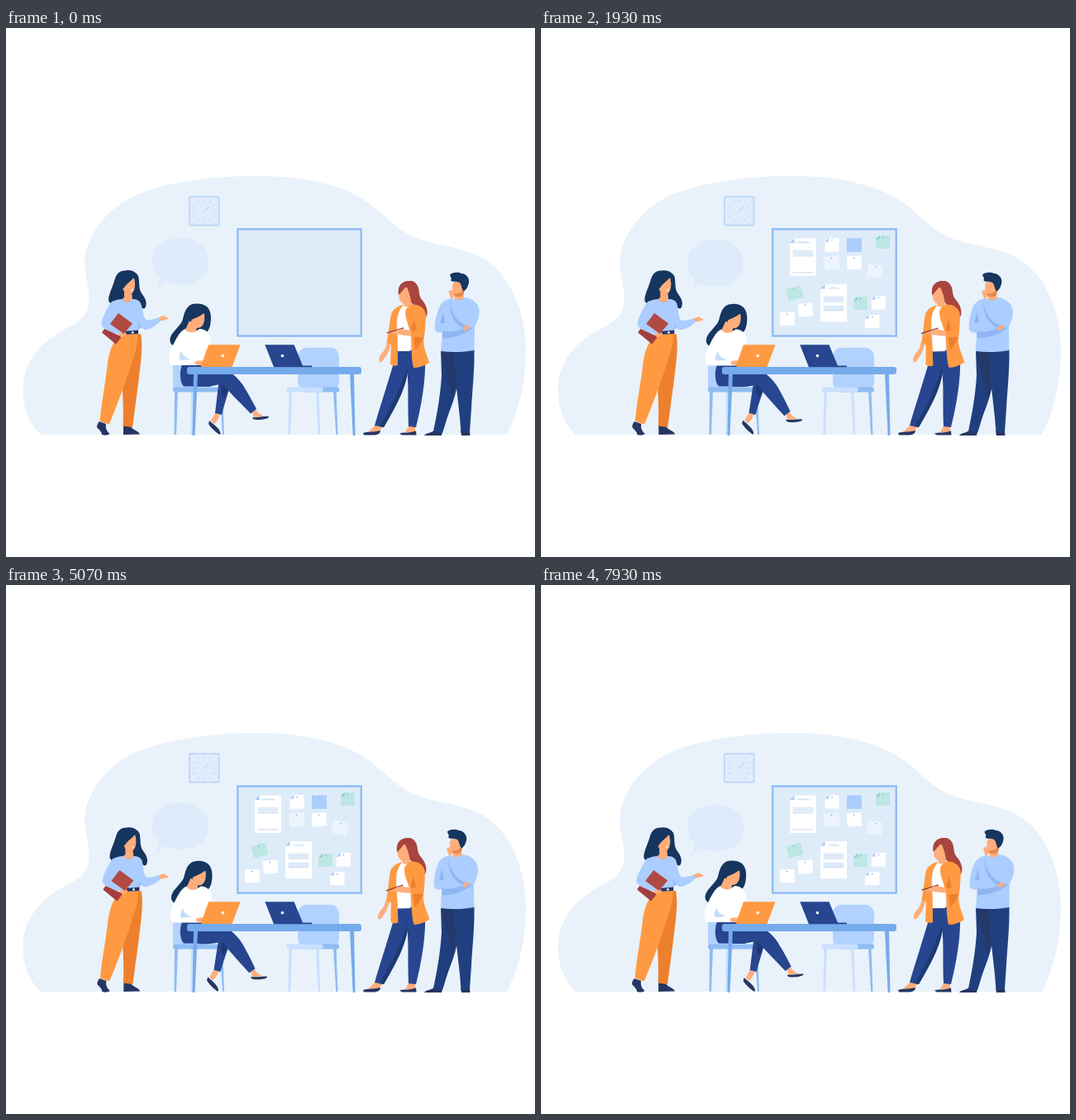
Write an HTML page with a canvas that moves like this. It is 640 px wide and 640 px high and loops after 8 s.

```html
<!DOCTYPE html>
<html lang="en">
<head>
<meta charset="utf-8">
<title>Team meeting</title>
<style>
html, body { margin: 0; width: 100%; height: 100%; overflow: hidden; background: #fff; }
canvas { display: block; width: 100vw; height: 100vh; }
</style>
</head>
<body>
<canvas id="stage" width="640" height="640"></canvas>
<script>
const ctx = document.getElementById('stage').getContext('2d');
const LOOP = 8000, FPS = 14;
const SKIN = '#ffad7b', NAVY = '#16355f', SHOE = '#253662', JEANS = '#27468f',
      ORANGE = '#ff9a42', RUST = '#ee802d', BLUE = '#abcdff', SHADE = '#8fb6f2',
      RED = '#a9453e', MID = '#8fbcf3', CHAIR = '#b1d2ff', LIGHT = '#c9e0ff';

const cache = new Map();
function fill(color, d) {
  if (!cache.has(d)) cache.set(d, new Path2D(d));
  ctx.fillStyle = color;
  ctx.fill(cache.get(d));
}
function box(color, x, y, w, h, r = 0) {
  ctx.fillStyle = color;
  ctx.beginPath();
  ctx.roundRect(x, y, w, h, r);
  ctx.fill();
}
function dot(color, x, y, rx, ry = rx) {
  ctx.fillStyle = color;
  ctx.beginPath();
  ctx.ellipse(x, y, rx, ry, 0, 0, 7);
  ctx.fill();
}
function line(color, width, x1, y1, x2, y2) {
  ctx.strokeStyle = color;
  ctx.lineWidth = width;
  ctx.beginPath();
  ctx.moveTo(x1, y1);
  ctx.lineTo(x2, y2);
  ctx.stroke();
}
function group(move, draw) {
  ctx.save();
  move();
  draw();
  ctx.restore();
}
const shift = (x, y) => () => ctx.translate(x, y);
const turn = (x, y, a) => () => {
  ctx.translate(x, y);
  ctx.rotate(a);
  ctx.translate(-x, -y);
};

// damped spring from 0 to 1
function spring(ms) {
  if (ms <= 0) return 0;
  const a = ms * 0.0095;
  return 1 - Math.exp(-0.6 * a) * Math.cos(a);
}

// x, y, width, height, angle, colour, start, folded corner colour
const notes = [
  [379, 262.6, 18, 16.6, 0, '#abcefe', 330],
  [298, 352, 18, 16, 0, '#fff', 310],
  [379, 283.8, 17.5, 16, -0.07, '#fff', 380],
  [320, 341, 17.5, 16, -0.08, '#fff', 380],
  [404, 294, 18, 15.5, 0.17, '#edf4fd', 590],
  [352, 284, 18, 16, -0.08, '#edf4fd', 647],
  [307, 321, 18, 15, -0.25, '#bce7e3', 690],
  [352, 262.5, 17, 16.5, 0, '#fff', 790, '#a9ccf8'],
  [386.5, 333, 17, 16, 0, '#bce7e3', 900, '#86cfc0'],
  [408.5, 332.3, 17, 16.5, 0, '#fff', 980, '#a9ccf8'],
  [400.8, 355, 17.5, 16, 0, '#fff', 1060, '#a9ccf8'],
  [413.5, 259, 17, 16, 0, '#bce7e3', 1120, '#86cfc0'],
];

function pop(x, y, angle, start, t, draw) {
  const k = spring(t - start);
  if (k <= 0) return;
  group(() => {
    ctx.translate(x, y);
    ctx.rotate(angle);
    ctx.scale(k, k);
  }, draw);
}
function fold(x, y, size, color) {
  fill('#deecfa', `M${x} ${y}h${size}L${x} ${y + size}Z`);
  fill(color, `M${x + size} ${y}v${size}h${-size}Z`);
}
function sheet(x, y, start, t, rows, title) {
  pop(x, y, 0, start, t, () => {
    box('#fff', -16, -22.7, 32, 45.4);
    fold(-16, -22.7, 5.5, '#a9ccf8');
    line('#b4cff3', 0.8, -title, -17.5, title, -17.5);
    line('#d3e3f8', 0.7, -title + 2, -19, title - 2, -19);
    for (const r of rows) line('#b4cff3', 0.8, -12.3, r, 12.3, r);
  });
}
function board(t) {
  box('#deecfa', 280, 243, 150, 130);
  ctx.strokeStyle = '#90bdf3';
  ctx.lineWidth = 2.4;
  ctx.strokeRect(280.3, 243.4, 149.4, 129.2);
  sheet(317, 277.2, 50, t, [-7.4, -5.4, -3.4, -1.4, 18.7], 8);
  sheet(354, 332.6, 280, t, [-7, -5.2, -3.4, -1.6, 4, 5.8, 7.6, 9.2], 6.5);
  for (const [x, y, w, h, angle, color, start, corner] of notes) {
    pop(x, y, angle, start, t, () => {
      box(color, -w / 2, -h / 2, w, h);
      if (corner) fold(-w / 2, -h / 2, 4.5, corner);
      dot('#8ba8cf', 0, -h / 2 + 2.4, 0.8);
    });
  }
}

function room(drop) {
  fill('#e9f2fa', 'M42 492C30 481 20.5 462 20.5 438C20.5 411 35 388 57 373C73 362 88 358 96 346C106 329 97 308 95.5 290C93 260 112 229 146 208C176 190 240 179 298 179C352 178 400 188 430 206C458 223 468 243 498 255C520 263 545 264 570 275C612 294 629 347 629 391C629 430 620 464 606 492Z');
  group(shift(0, drop), () =>
    fill('#deebfa', 'M177 282C177 265 190 254 211 254C231 254 245 265 245 282C245 300 232 310.5 213 310.5C204 310.5 197 309 192 306C189 309 184 314 180 317.5C184 311 185.5 306 185.5 301C180 296 177 290 177 282Z'));
  box('#bcd6fa', 221, 203.2, 37.5, 36.3, 2);
  box('#e0ebfb', 222.7, 204.9, 34.1, 32.9, 1);
  for (let i = 0; i < 12; i++) {
    const a = i * Math.PI / 6;
    dot('#bad2f4', 239.8 + 13.2 * Math.cos(a), 221.5 + 13 * Math.sin(a), 0.85);
  }
  line('#aac8f3', 1, 239.5, 222, 245.5, 216);
}

function chairs() {
  fill(MID, 'M204 440H208L206 492H203.5Z');
  fill(MID, 'M258.500 440H262L264 492H262Z');
  fill(LIGHT, 'M224 440H227L226 492H223.500Z');
  box(CHAIR, 202, 405, 24, 32, 4);
  box(MID, 202, 434.500, 62, 6, 2.5);
  fill(MID, 'M396 439H399.500L401.500 492H399.200Z');
  box(CHAIR, 353, 386.800, 50, 52, 11);
  box(MID, 360, 434.500, 43, 6, 2.5);
  box(LIGHT, 339.500, 434.500, 44, 6, 2.5);
  fill(LIGHT, 'M342.500 440H346L344 492H341.300Z');
  fill(LIGHT, 'M375 440H378.500L380.200 492H377.800Z');
}

function presenter(s) {
  group(() => ctx.transform(1, 0, -0.004 * s, 1, 2.5 * s, 0), () => {
    fill(SHOE, 'M113 476L121 479C120 484 122 488 125.500 491C123 493 118 493 116 492C116 488 112 486 110 483C110 480 111 478 113 476Z');
    fill(SHOE, 'M142 481L151 482C154 487 160 487 162 491.500L142 492Z');
    fill(RUST, 'M155 371L163 370C166 385 163 405 160 430L153 483L141.500 481.500C143 455 140 440 141 425C146 410 153 395 155 371Z');
    fill(ORANGE, 'M138 371L159 370C160 380 157 392 152 405C146 425 135 455 125 479C121 479 117 477 113.500 475C116 450 121 425 123 405C125 390 130 378 138 371Z');
  });
  group(shift(2.2 * s, 0.2 * s), () => {
    fill(NAVY, 'M145 293.500C138 293 134 297 132 303C130 311 126 318 124.500 325C123 332 126 334 131 333C140 334 150 332 155 330C160 335 165 341 168 339C172 333 168 326 164 321C160 315 162 306 160 300C157 295 151 292 145 293.500Z');
    fill(SKIN, 'M143 316L152 319L153 329C150 333 143 333 139 329L143 326Z');
    fill(SKIN, 'M141 309C142 301 150 299 155 303C157 310 156 317 153 320.500C147 322 141 319 141 314Z');
    fill(NAVY, 'M155 301C152 306 146 309 143 314L139 318L140 301C146 295 152 296 155 301Z');
    dot('#fff', 152.200, 316.800, 1.6, 0.7);
    fill(BLUE, 'M128 331C133 329 137 328 140 328C144 333 150 333 153 328C157 328 161 329 163 333C165 340 165 350 165 354L161 358L160 367L138 370C129 370 119 365 116 360C113 355 124 336 128 331Z');
    fill(SHADE, 'M160.500 349L164 362L160 365Z');
    fill(SHOE, 'M143 367L160 365.500V370L142 371Z');
    dot('#e9f2fa', 153.200, 368.200, 1.3, 1.5);
    fill('#a23f3e', 'M119 364L140 373.500L133 382.500L116 368.500Z');
    fill(SKIN, 'M136 370L144 367L146 371L139 374.500Z');
    fill('#b24a43', 'M136 345L153 357.500L142.500 370L126 358Z');
    group(turn(164, 350, 0.08 * s), () => {
      group(shift(-2 * s, 0), () => {
        fill(SKIN, 'M184 350.500C188 349 190 347.500 192 348.500L197 351.500C194 353 190 354 186 354.500Z');
        fill(BLUE, 'M155 330C161 329 163.500 333 165 340C166 348 168 353 171 353.500C176 353 181 351.500 185 350.500L187 354.500C181 361 173 365 168 365C162 364 160 354 158 345Z');
      });
    });
  });
}

function worker(s) {
  group(turn(262, 425, 0.06 * s), () => {
    fill(SKIN, 'M253 466L259 468C257 473 255 476 252 479L248 475Z');
    fill(SHOE, 'M246 475C249 478 254 481 257 485C259 488 260.500 491 258.500 492C254 489 248 484 245 479Z');
    fill(JEANS, 'M256 424C264 424 272 427 271 432C268 445 264 455 261 468L253 466C255 450 256 438 258 425Z');
    fill('#1f3874', 'M261 432L271 430C270 437 267 443 264 448C261 444 260 438 261 432Z');
  });
  group(turn(225, 425, 0.065 * s), () => {
    fill(SKIN, 'M298 465L302 462C305 466 308 468 312 469.500L300 471.500Z');
    fill(SHOE, 'M298 471C303 472 312 469 318 470C318 473 310 474 304 474C300 474 298 473 298 471Z');
    fill(JEANS, 'M240 412L271 416C276 420 282 425 286 431C293 442 299 453 303 461L296 466.500C288 458 270 441 262 430C256 432 245 434 232 434Z');
  });
  fill(JEANS, 'M213 407C209 418 211 430 215 433.500L246 434C256 432 262 427 272 418L262 408Z');
  group(shift(2.5 * s, 0.7 * s), () => {
    fill(NAVY, 'M229 333.500C219 334 216 343 214 352C212 360 202 366 199 374C197 380 200 385 205 384C212 380 222 370 232 370C240 372 245 368 247 360C249 350 248 342 243 337C239 334 234 333 229 333.500Z');
    fill('#fff', 'M217 364C222 367 230 368 234 364C241 364 246 368 247 375C249 385 247 390 244 395L236 408H200C196 405 197 396 200 388C205 378 210 366 217 364Z');
    fill(SKIN, 'M222 354L231 361L230 367C226 369 220 369 217 365Z');
    fill(SKIN, 'M225 350C228 345 236 343 240 346C241 354 239 361 234 362.500C229 364 225 361 224 356Z');
    fill(NAVY, 'M222 355C228 350 235 350 240 344L242 349C243 345 240 338 232 337C226 338 221 345 222 355Z');
    fill('#c5dcfa', 'M212 391C209 396 209 400 211 402L224 401C217 399 214 396 212 391Z');
  });
}

function table(s) {
  const color = '#76abeb';
  fill(color, 'M227 418H232L228.500 493H225.500Z');
  fill(color, 'M416 418H421L422.500 493H419.700Z');
  box(color, 219, 410, 211, 9, 3);
  group(shift(2.3 * s, 0), () =>
    fill(SKIN, 'M228 404C232 401.500 236 402 239 403L241 407L238 409L229 407Z'));
  fill(ORANGE, 'M245 383.200H283.500L273.500 410H237L236 408.500Z');
  dot('#fff', 262.300, 396.600, 1.8);
  fill(JEANS, 'M313.300 383.200H348.500L359 408.500H370V410.300H324Z');
  dot('#fff', 334.400, 396.600, 1.8);
}

function listener(s) {
  fill(SKIN, 'M447 480L456 482L450 490L438 489Z');
  fill(SHOE, 'M432 490C437 488 443 489 448 488L453 487C453 491 449 492.500 444 492.500H433Z');
  fill(SKIN, 'M488 480L495 482V490L483 489Z');
  fill(SHOE, 'M476 490.500C481 488.500 486 490 490 489L496 487.500L496.500 492.500H479Z');
  fill(JEANS, 'M474 388L492 390C488 415 478 440 470 458C465 468 461 477 457 483L446 481C452 460 462 430 474 388Z');
  fill('#1d3a74', 'M487 405C487 430 474 455 457 483L452 482C465 460 476 440 487 405Z');
  fill(JEANS, 'M484 388L507 400C508 425 503 455 496 483L487 482C486 455 487 440 486 425Z');
  group(shift(-2 * s, 0), () =>
    fill(SKIN, 'M461 380L466 382C463 390 462 395 458 399C456 403 454 405 452 404C450 401 452 397 455 393C459 389 460 385 461 380Z'));
  group(turn(490, 392, -0.042 * s), () => {
    fill(RED, 'M488 306C479 306 474 312 475 320L490 330C491 335 495 337 497 341C499 346 501 350 506 352C512 348 510 338 505 331C498 324 501 318 498 312C496 308 492 306 488 306Z');
    fill('#fff', 'M475 337L490 335L489 391H473Z');
    fill(SKIN, 'M482 330L490 326V335C487 338 483 338 481 336Z');
    fill(SKIN, 'M476 318C479 313 486 312 489 317C490 324 489 330 486 333C481 336 476 331 475.500 325Z');
    fill(RED, 'M488 306C479 306 473 313 475 323C478 320 482 315 485 312C486 318 490 324 490 332L496 336C496 328 499 318 497 311C495 307 492 306 488 306Z');
    fill(ORANGE, 'M481 335C474 336 468 340 466 346C464 356 463 368 460.500 381L466 383L465 407C468 409 471 409 474 408C474 390 474 380 473 365C472 352 474 342 481 335Z');
    fill(ORANGE, 'M489 335C498 333 507 338 508 347C508 355 507 365 506 373C503 385 510 396 512 405C506 409 499 411 493 411C490 400 491 385 490 372C487 358 481 348 484 340Z');
    fill(RUST, 'M494 353C491 360 490 364 491 367L497 366C496 361 495 357 494 353Z');
    fill(RUST, 'M493 374L505 374C503 380 499 386 495 390Z');
    line('#853637', 1.3, 460.500, 369, 481, 362.800);
    fill(SKIN, 'M490 366V372.500C483 373 476 370 465 370C470 367 478 362 483 365Z');
  });
}

function thinker(s) {
  const denim = '#203f7e';
  fill(SHOE, 'M518 487L528 488L527 493H506C508 490 514 490 518 487Z');
  fill(SHOE, 'M550 487L561 488L561.500 493H551Z');
  fill(denim, 'M526 390L552 391C550 415 546 440 538 460C533 472 531 482 528 490L517 488C522 465 526 440 527 420Z');
  fill('#24396a', 'M526 390H542L545 430L540 446C537 425 529 410 526 390Z');
  fill(denim, 'M541 390L566.500 389C567 415 564 440 563 460L561 489H550.500C549 465 545 440 543 415Z');
  group(() => ctx.transform(1, 0, 0.054 * s, 1, -21.200 * s, 0), () => {
    fill(SKIN, 'M543 322L553 318L554 328C551 331 546 331 543 329Z');
    fill(SKIN, 'M540 311C541 305 550 305 554 308C556 314 554 322 550 325C545 327 540 325 539.500 319Z');
    fill('#df8a50', 'M542 321C546 322 551 321 554 315C555 320 554 324 549 325C545 326 542 324 542 321Z');
    fill(NAVY, 'M537 298.500C541 295 548 295.500 551 297C557 297 561 303 560 308C559 313 556 318 553.500 318.500C551 315 551 310 549 308C545 306 540 308 538 305C540 303 538 302 537 298.500Z');
    fill(BLUE, 'M541 327C530 328 526 333 523 341C520 350 518 358 519 365C521 369 525 369 528 368L526 391C540 393 555 392 566.500 390L567 362C571 354 574 346 572 339C570 331 562 327 555 326C551 330 545 330 541 327Z');
    fill(SHADE, 'M528.500 344L525.500 357L531 357C531 352 530 348 528.500 344Z');
    fill(SHADE, 'M528 367C540 369 551 365 559 361L565 363C553 372 540 375 528 375.500Z');
    fill(SHADE, 'M537 330C538 345 546 356 557 360L553 363C542 358 536 344 537 330Z');
    fill(SKIN, 'M553 362.500C556 360 560 359 561 360.500C561 363 558 366 554 366Z');
    fill(SKIN, 'M535.500 319C537 316 540 317 541 320L543 325L538 327.500Z');
  });
}

function draw(t) {
  const sway = (1 - Math.cos(2 * Math.PI * (t + 85) / 7260)) / 2;
  const drop = 6 * (1 - Math.cos(Math.PI * t / 7350));
  ctx.fillStyle = '#fff';
  ctx.fillRect(0, 0, 640, 640);
  room(drop);
  board(t);
  chairs();
  presenter(sway);
  worker(sway);
  table(sway);
  listener(sway);
  thinker(sway);
}

const begin = performance.now();
function tick() {
  const ms = (performance.now() - begin) % LOOP;
  draw(Math.floor((ms + 5) * FPS / 1000) * 1000 / FPS);
  requestAnimationFrame(tick);
}
tick();
</script>
</body>
</html>
```
